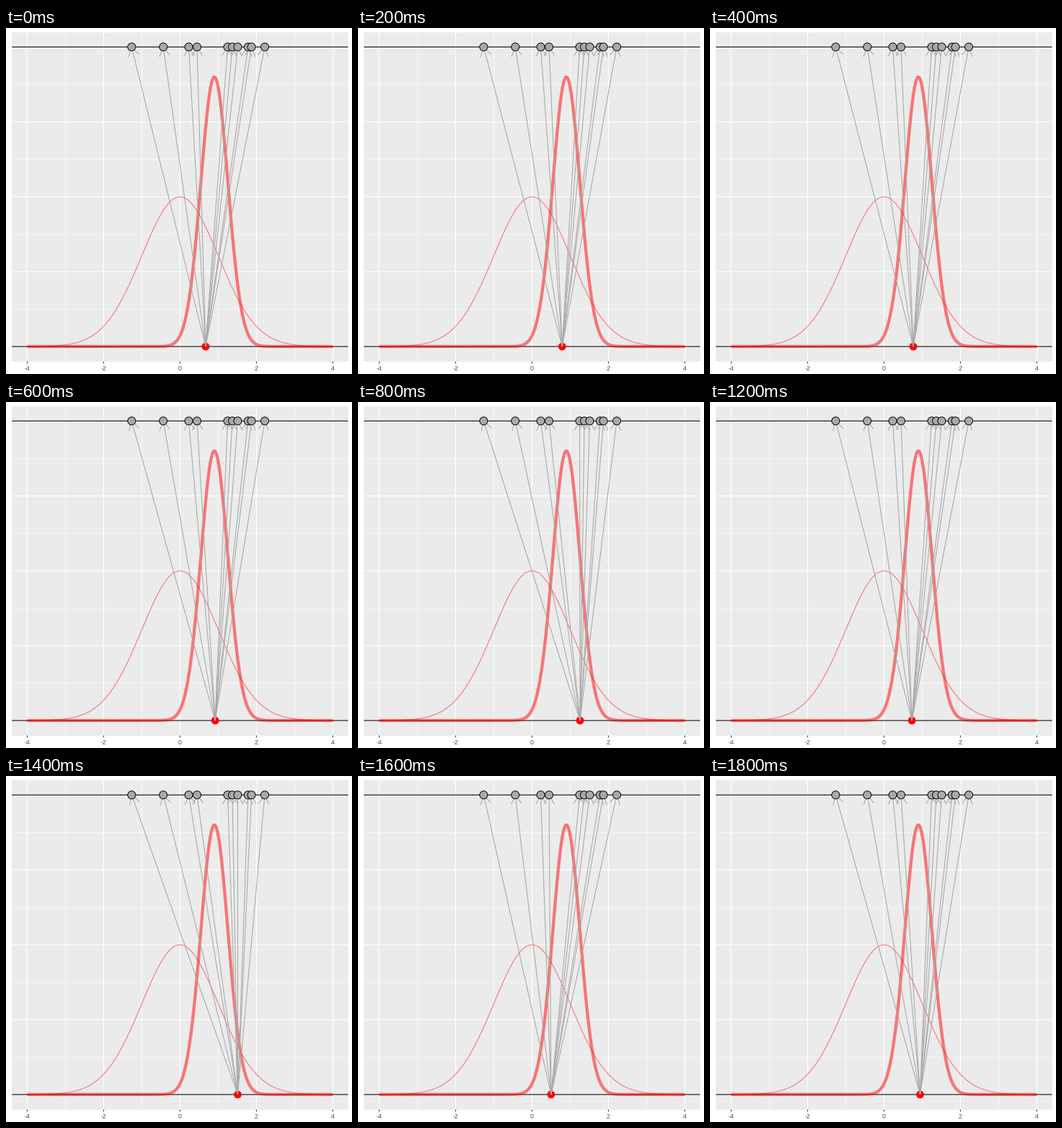
Write a matplotlib script that moves like this. It is 480 by 480 pixels and loops after 2 s.

```python
import numpy as np
import matplotlib.pyplot as plt
from matplotlib.animation import FuncAnimation
from matplotlib.collections import LineCollection
from matplotlib.patches import Circle, Rectangle

SIZE, DPI = 480, 72                      # one point equals one pixel
LEFT, RIGHT, TOP, BOTTOM = 8.2, 474.5, 5.5, 462.7
X0, UNIT = 241.4, 53.0                   # pixel of x = 0, pixels per unit
Y_TOP, Y_BASE = 26.3, 441.9
THIN, THICK = 1.07, 4.27
WING, SPREAD = 14.4, np.radians(30)

DATA = [-1.266, -0.438, 0.228, 0.445, 1.247, 1.37, 1.511, 1.781, 1.87, 2.219]
MEANS = [0.67, 0.79, 0.766, 0.92, 1.257, -0.07, 0.73, 1.51, 0.5, 0.945]


def px(x):
    return X0 + UNIT * x


def py(y):
    return Y_BASE + (Y_TOP - Y_BASE) * y


fig = plt.figure(figsize=(SIZE / DPI, SIZE / DPI), dpi=DPI, facecolor="white")
ax = fig.add_axes([0, 0, 1, 1])
ax.set_xlim(0, SIZE)
ax.set_ylim(SIZE, 0)
ax.axis("off")


def line(x, y, color, width, z, **style):
    ax.plot(x, y, color=color, lw=width, zorder=z, snap=False,
            solid_capstyle="butt", **style)


def grid(xs, ys, width):
    for x in xs:
        line([px(x)] * 2, [TOP, BOTTOM], "white", width, 1)
    for y in ys:
        line([LEFT, RIGHT], [py(y)] * 2, "white", width, 1)


def bell(mean, sd, height, width):
    x = np.linspace(-4, 4, 401)
    y = height * np.exp(-0.5 * ((x - mean) / sd) ** 2)
    line(px(x), py(y), "red", width, 3, alpha=0.5)


def arrow(start, tip):
    """Shaft and open head as two polylines."""
    start, tip = np.array(start), np.array(tip)
    back = np.arctan2(*(start - tip)[::-1])
    wings = [tip + WING * np.array([np.cos(a), np.sin(a)])
             for a in (back - SPREAD, back + SPREAD)]
    return [[start, tip], [wings[0], tip, wings[1]]]


ax.add_patch(Rectangle((LEFT, TOP), RIGHT - LEFT, BOTTOM - TOP,
                       fc="#EBEBEB", ec="none", zorder=0))
grid(range(-3, 4, 2), np.arange(0.125, 1, 0.25), THIN / 2)
grid(range(-4, 5, 2), np.arange(0, 1.1, 0.25), THIN)

for y in (Y_TOP, Y_BASE):
    line([LEFT, RIGHT], [y, y], "black", THIN, 2)
for x in range(-4, 5, 2):
    line([px(x)] * 2, [BOTTOM, BOTTOM + 2.75], "#333333", THIN, 2)
    ax.text(px(x), 474.8, f"{x}", family="Liberation Sans", size=8.8,
            color="#4D4D4D", ha="center", va="baseline")

bell(0, 1, 0.5, THIN)
bell(0.9, 0.355, 0.9, THICK)

dot = ax.add_patch(Circle((px(MEANS[0]), Y_BASE), 5.4, fc="red", ec="none", zorder=4))
arrows = ax.add_collection(LineCollection(
    [], colors="#A9A9A9", linewidths=THIN, zorder=5), autolim=False)
for x in DATA:
    ax.add_patch(Circle((px(x), Y_TOP), 5.5, fc="#A9A9A9", ec="black",
                        lw=0.95, zorder=6))


def draw(i):
    start = (px(MEANS[i]), Y_BASE)
    dot.center = start
    arrows.set_segments([part for x in DATA for part in arrow(start, (px(x), Y_TOP))])
    return dot, arrows


anim = FuncAnimation(fig, draw, frames=len(MEANS), interval=200,
                     repeat=True, repeat_delay=0)
plt.show()
```
